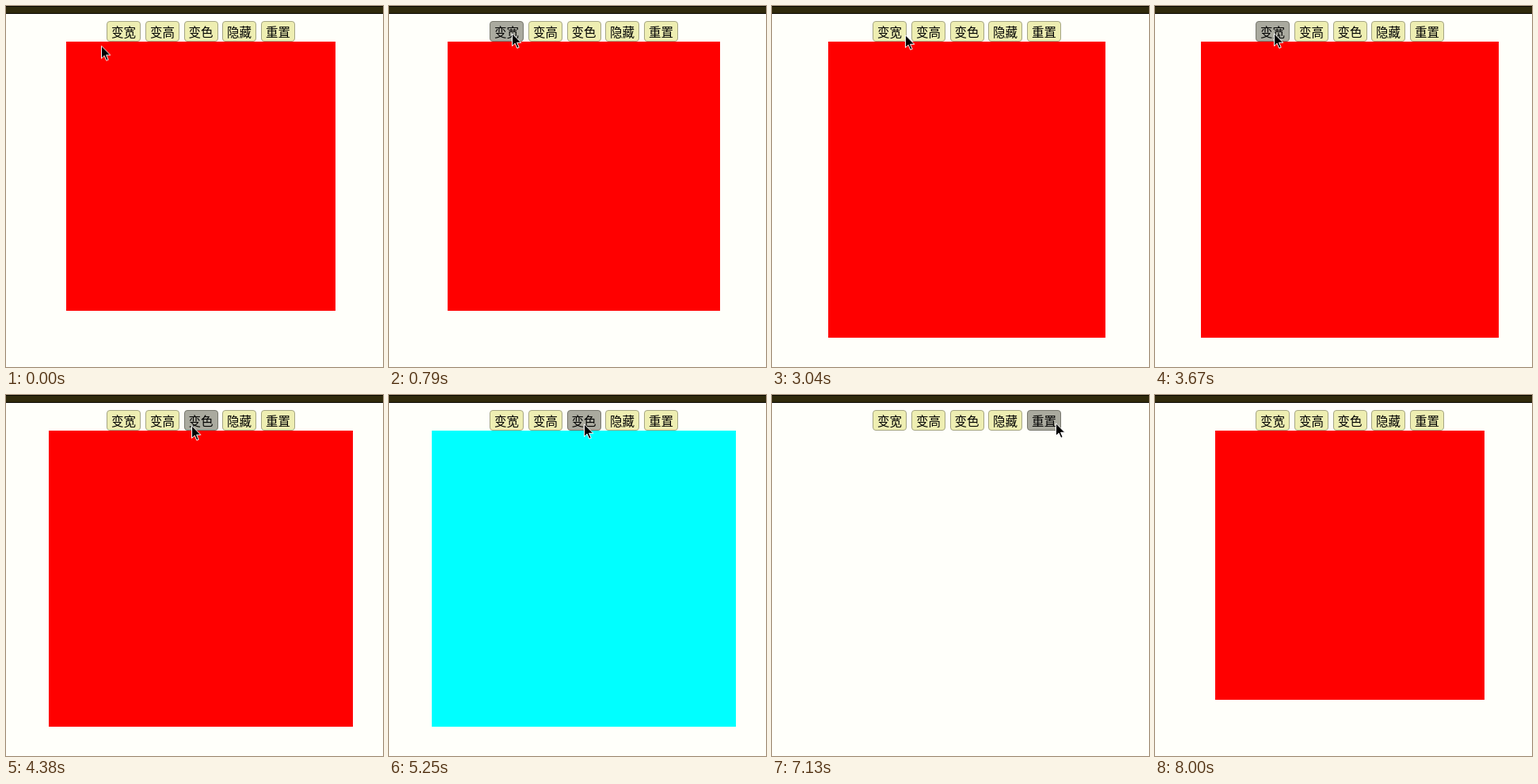
An HTML page that plays this animation: 476x456 px, repeating every 8080 ms.

```html
<!DOCTYPE html>
<html lang="zh-CN">
<head>
<meta charset="utf-8">
<title>Box controls</title>
<style>
html, body { margin: 0; width: 100%; height: 100%; overflow: hidden; }
body { position: relative; background: #fffffa; }
body > * { position: absolute; box-sizing: border-box; }

.bar {
  left: 0; top: 0; width: 100%; height: 10px;
  background: #302a0c;
  border: solid #080700; border-width: 1px 0;
}

.btn {
  top: 19px; width: 43px; height: 26px;
  border: 1px solid #a5a583; border-radius: 4px;
  background: #eeeeb2; color: #000;
  font: 15.5px/25px "Noto Sans CJK SC", "Noto Sans CJK", sans-serif;
  text-align: center; white-space: nowrap;
  animation: 8.08s step-end infinite;
}
.wide  { left: 127px; animation-name: wide; }
.tall  { left: 176px; animation-name: tall; }
.color { left: 224.5px; animation-name: color; }
.hide  { left: 273px; animation-name: hide; }
.reset { left: 322px; animation-name: reset; }

.box {
  left: 76px; top: 45px; width: 340px; height: 340px;
  background: #f00;
  animation: size 8.08s linear infinite, state 8.08s step-end infinite;
}

.cursor {
  left: 0; top: 0; width: 14px; height: 22px; overflow: visible;
  animation: move 8.08s linear infinite, leave 8.08s step-end infinite;
}

/* Hovered buttons */
@keyframes wide {
  2.5%, 37.8% { background: #aaaa9f; border-color: #77776d; }
  15.4%, 51.9% { background: #eeeeb2; border-color: #a5a583; }
}
@keyframes tall {
  16%, 52.5% { background: #aaaa9f; border-color: #77776d; }
  36.6%, 53.4% { background: #eeeeb2; border-color: #a5a583; }
}
@keyframes color {
  53.7% { background: #aaaa9f; border-color: #77776d; }
  70.2% { background: #eeeeb2; border-color: #a5a583; }
}
@keyframes hide {
  70.8% { background: #aaaa9f; border-color: #77776d; }
  83.8% { background: #eeeeb2; border-color: #a5a583; }
}
@keyframes reset {
  84.2% { background: #aaaa9f; border-color: #77776d; }
  92.8% { background: #eeeeb2; border-color: #a5a583; }
}

@keyframes size {
  0%, 8.79% { left: 76px; width: 340px; height: 340px; }
  11.39%, 30.45% { left: 71px; width: 350px; height: 340px; }
  35.64%, 40.72% { left: 71px; width: 350px; height: 374px; }
  46.91%, 85% { left: 54px; width: 384px; height: 374px; }
  85.01%, 100% { left: 76px; width: 340px; height: 340px; }
}
@keyframes state {
  0% { background: #f00; opacity: 1; }
  64.98% { background: #0ff; opacity: 1; }
  80.94% { background: #f00; opacity: 0; }
  89.23%, 100% { background: #f00; opacity: 1; }
}

@keyframes move {
  0%, .1% { transform: translate(119px, 50px); }
  4.08%, 14.3% { transform: translate(155px, 34px); }
  18.07%, 20.7% { transform: translate(198px, 30px); }
  24.26%, 35.64% { transform: translate(200px, 34px); }
  37.62% { transform: translate(168px, 36px); }
  40.22%, 51.11% { transform: translate(150px, 34px); }
  54.21% { transform: translate(234px, 38px); }
  56.19%, 68.07% { transform: translate(246px, 36px); }
  72.77%, 75.5% { transform: translate(297px, 32px); }
  76.36%, 83.04% { transform: translate(301px, 33px); }
  85.64%, 92% { transform: translate(358px, 35px); }
  98.5%, 100% { transform: translate(428px, 401px); }
}
@keyframes leave {
  0% { opacity: 1; }
  98.9%, 99.99% { opacity: 0; }
}
</style>
</head>
<body>
<div class="bar"></div>
<div class="box"></div>
<div class="btn wide">变宽</div>
<div class="btn tall">变高</div>
<div class="btn color">变色</div>
<div class="btn hide">隐藏</div>
<div class="btn reset">重置</div>
<svg class="cursor" viewBox="0 0 14 22">
  <path d="M.5.8V16.6L4.2 13.2 6.8 19.3 9.2 18.3 6.6 12.3H11.8Z" fill="#000" stroke="#fff"/>
</svg>
</body>
</html>
```
